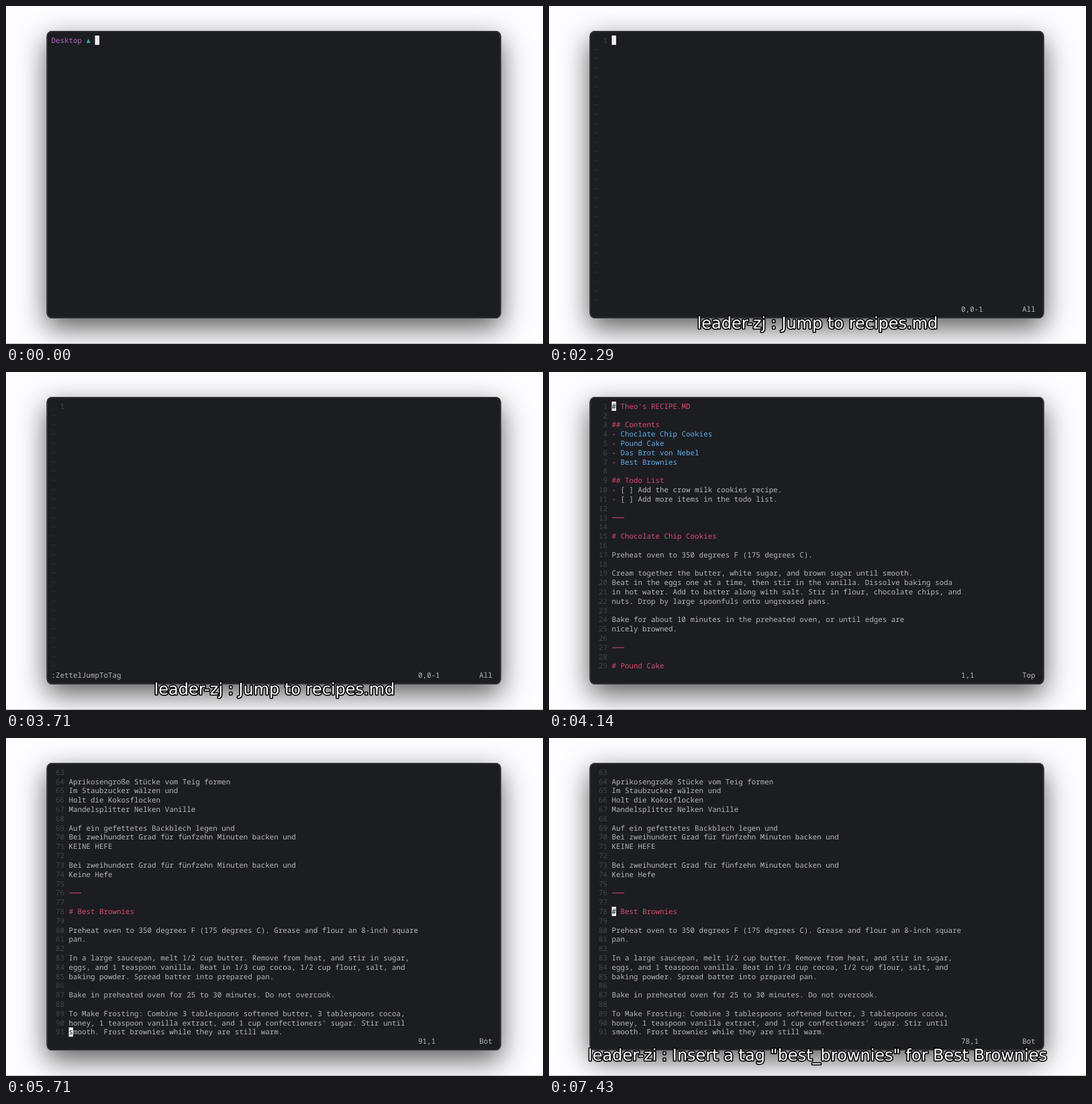
Write an HTML page with a canvas that moves like this. It is 800x503 px and loops after 8000 ms.

```html
<!DOCTYPE html>
<html lang="en">
<head>
<meta charset="utf-8">
<title>Terminal notes demo</title>
<style>
html, body { margin: 0; width: 100%; height: 100%; overflow: hidden; background: #fdfcfe; }
canvas { display: block; width: 800px; height: 503px; }
</style>
</head>
<body>
<canvas id="stage"></canvas>
<script>
const W = 800, H = 503, LOOP = 8000;
const CELL_W = 6.505, CELL_H = 13.81, LEFT = 67.5, TOP = 44;
const MONO = '10.84px "Noto Sans Mono", "DejaVu Sans Mono", monospace';
const COLOR = {
  bg: '#1c1d21', text: '#b4b7be', dim: '#44464d', tilde: '#34363c',
  pink: '#dc4a6c', blue: '#5cb0ec', teal: '#6fb5a8', white: '#efedf2',
  purple: '#b963c8', green: '#35a69c', frame: '#55575b', row: '#28292a',
  red: '#b8283f', sand: '#b9b696', bright: '#dedfe2', slate: '#8faecb', cursor: '#a4a8b4'
};

const HEAD = `# Theo's RECIPE.MD

## Contents
- Choclate Chip Cookies
- Pound Cake
- Das Brot von Nebel
- Best Brownies

## Todo List
- [ ] Add the crow milk cookies recipe.
- [ ] Add more items in the todo list.

---

# Chocolate Chip Cookies

Preheat oven to 350 degrees F (175 degrees C).

Cream together the butter, white sugar, and brown sugar until smooth.
Beat in the eggs one at a time, then stir in the vanilla. Dissolve baking soda
in hot water. Add to batter along with salt. Stir in flour, chocolate chips, and
nuts. Drop by large spoonfuls onto ungreased pans.

Bake for about 10 minutes in the preheated oven, or until edges are
nicely browned.

---

# Pound Cake`.split('\n');

const TAIL = `
Aprikosengroße Stücke vom Teig formen
Im Staubzucker wälzen und
Holt die Kokosflocken
Mandelsplitter Nelken Vanille

Auf ein gefettetes Backblech legen und
Bei zweihundert Grad für fünfzehn Minuten backen und
KEINE HEFE

Bei zweihundert Grad für fünfzehn Minuten backen und
Keine Hefe

---

# Best Brownies

Preheat oven to 350 degrees F (175 degrees C). Grease and flour an 8-inch square
pan.

In a large saucepan, melt 1/2 cup butter. Remove from heat, and stir in sugar,
eggs, and 1 teaspoon vanilla. Beat in 1/3 cup cocoa, 1/2 cup flour, salt, and
baking powder. Spread batter into prepared pan.

Bake in preheated oven for 25 to 30 minutes. Do not overcook.

To Make Frosting: Combine 3 tablespoons softened butter, 3 tablespoons cocoa,
honey, 1 teaspoon vanilla extract, and 1 cup confectioners' sugar. Stir until
smooth. Frost brownies while they are still warm.`.split('\n');

const TAGS = [['3', 'das_brot', '45'], ['2', 'pound_cake', '29'], ['1', 'cc_cookies', '15'], ['0', 'recipes', ' 1']];
const JUMP = 'leader-zj : Jump to recipes.md';
const INSERT = 'leader-zi : Insert a tag "best_brownies" for Best Brownies';
// [start time, cursor line]
const MOVES = [[3860, 1], [4710, 2], [5000, 3], [5140, 4], [5290, 5], [5570, 91],
  [6000, 90], [6140, 85], [6570, 83], [6710, 80], [6860, 78]];

const canvas = document.getElementById('stage');
const ctx = canvas.getContext('2d');
const scale = window.devicePixelRatio || 1;
canvas.width = Math.round(W * scale);
canvas.height = Math.round(H * scale);
ctx.scale(scale, scale);
ctx.textRendering = 'geometricPrecision';

const colX = col => LEFT + col * CELL_W;
const rowY = row => TOP + row * CELL_H;

function put(col, row, text, color = COLOR.text) {
  ctx.font = MONO;
  ctx.fillStyle = color;
  [...text].forEach((ch, i) => {
    if (ch !== ' ') ctx.fillText(ch, colX(col + i), rowY(row) + 10.8);
  });
}

function fillCells(col, row, cols, rows, color) {
  ctx.fillStyle = color;
  ctx.fillRect(colX(col), rowY(row), cols * CELL_W, rows * CELL_H);
}

function cursor(col, row, ch = ' ') {
  fillCells(col, row, 1, 1, COLOR.white);
  put(col, row, ch, COLOR.bg);
}

function frame(c0, r0, c1, r1) {
  const x = colX(c0 + .5), y = rowY(r0 + .5);
  ctx.strokeStyle = COLOR.frame;
  ctx.lineWidth = 1;
  ctx.beginPath();
  ctx.roundRect(x, y, colX(c1 + .5) - x, rowY(r1 + .5) - y, 2);
  ctx.stroke();
}

function drawWindow() {
  ctx.fillStyle = '#fdfcfe';
  ctx.fillRect(0, 0, W, H);
  ctx.fillStyle = '#bdbcbe';
  ctx.fillRect(0, 502, W, 1);
  ctx.save();
  ctx.shadowColor = 'rgba(0,0,0,.64)';
  ctx.shadowBlur = 40 * scale;
  ctx.shadowOffsetY = 14 * scale;
  ctx.fillStyle = COLOR.bg;
  ctx.beginPath();
  ctx.roundRect(60.5, 37, 677, 428, 8);
  ctx.fill();
  ctx.restore();
  ctx.strokeStyle = '#38393d';
  ctx.lineWidth = 1.4;
  ctx.beginPath();
  ctx.roundRect(61.2, 37.7, 675.6, 426.6, 7.5);
  ctx.stroke();
}

function drawPrompt(t) {
  const typed = t < 1140 ? '' : t < 1290 ? 'v' : 'vi';
  put(0, 0, 'Desktop', COLOR.purple);
  put(8, 0, '▲', COLOR.green);
  put(10, 0, typed);
  cursor(10 + typed.length, 0);
}

function drawStatus(position, place) {
  put(84, 29, position);
  put(98, 29, place);
}

function drawEmptyBuffer(t) {
  put(2, 0, '1', COLOR.dim);
  for (let row = 1; row < 29; row++) put(0, row, '~', COLOR.tilde);
  drawStatus('0,0-1', 'All');
  if (t < 2430) cursor(4, 0);
  else put(0, 29, ':ZettelJumpToTag');
}

function drawPicker(t) {
  frame(5, 6, 95, 23);
  if (t < 2710) return;
  frame(7, 7, 93, 14);
  put(7, 22, 'Tag>', COLOR.slate);
  fillCells(12, 22, 1, 1, COLOR.cursor);
  if (t < 2860) return;
  fillCells(7, 16, 1, 4, COLOR.row);
  fillCells(7, 19, 85, 1, COLOR.row);
  TAGS.forEach(([index, name, line], i) => {
    const color = i === 3 ? COLOR.bright : COLOR.text;
    const row = 16 + i;
    put(12, row, index, color);
    put(15, row, name, color);
    put(33, row, 'food', color);
    put(53, row, line, color);
    put(57, row, '/Users/theo/Desktop/food/recipes.md', color);
  });
  put(7, 19, '>', COLOR.red);
  put(12, 20, '#  tagname', COLOR.teal);
  put(33, 20, 'tagfile', COLOR.teal);
  put(51, 20, 'line  filepath', COLOR.teal);
  put(9, 21, '4/4', COLOR.sand);
  put(13, 21, '( )', COLOR.red);
  put(14, 21, '0', COLOR.sand);
  if (t >= 3000) HEAD.slice(0, 6).forEach((line, i) => put(9, 8 + i, line));
}

function drawLine(row, line) {
  if (line === '---') {
    ctx.fillStyle = COLOR.pink;
    ctx.fillRect(colX(4) + .8, rowY(row) + 6.6, 3 * CELL_W - 1.6, 1);
  } else if (line.startsWith('- ')) {
    put(4, row, '-', COLOR.pink);
    put(6, row, line.slice(2), line[2] === '[' ? COLOR.text : COLOR.blue);
  } else {
    put(4, row, line, line[0] === '#' ? COLOR.pink : COLOR.text);
  }
}

function drawFile(t) {
  const current = MOVES.filter(([start]) => start <= t).pop()[1];
  const atEnd = t >= 5570;
  const lines = atEnd ? TAIL : HEAD;
  const first = atEnd ? 63 : 1;
  lines.forEach((line, row) => {
    put(0, row, String(first + row).padStart(3), COLOR.dim);
    drawLine(row, line);
  });
  const row = current - first;
  cursor(4, row, lines[row][0] || ' ');
  drawStatus(`${current},${lines[row] ? '1' : '0-1'}`, atEnd ? 'Bot' : 'Top');
}

function drawCaption(text) {
  ctx.font = '24px "DejaVu Sans", sans-serif';
  ctx.textAlign = 'center';
  ctx.lineJoin = 'round';
  ctx.lineWidth = 3.2;
  ctx.strokeStyle = '#000';
  ctx.strokeText(text, 400, 479.5);
  ctx.fillStyle = '#fff';
  ctx.fillText(text, 400, 479.5);
  ctx.textAlign = 'left';
}

function draw(t) {
  drawWindow();
  if (t < 1860) drawPrompt(t);
  else if (t < 2000) cursor(0, 0);
  else if (t < 3860) drawEmptyBuffer(t);
  else drawFile(t);
  if (t >= 2570 && t < 3710) drawPicker(t);
  if (t >= 2290 && t < 4140) drawCaption(JUMP);
  if (t >= 7290) drawCaption(INSERT);
}

const started = performance.now();
function tick() {
  draw((performance.now() - started) % LOOP);
  requestAnimationFrame(tick);
}
tick();
</script>
</body>
</html>
```
